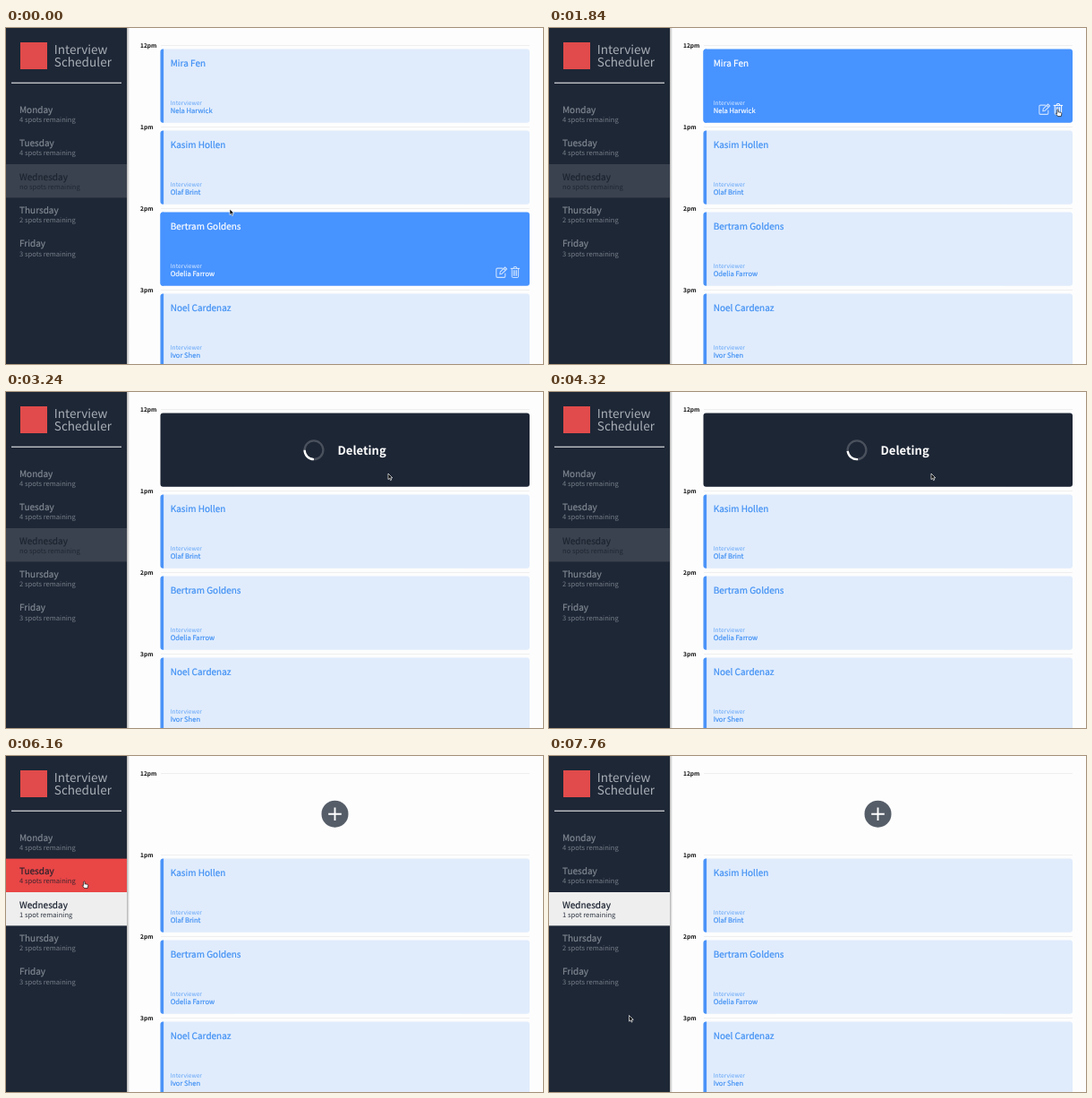
An HTML page that plays this animation: 600 px wide and 375 px high, repeating every 7.8 s.

```html
<!DOCTYPE html>
<html lang="en">
<head>
<meta charset="utf-8">
<title>Interview Scheduler</title>
<style>
  html, body { margin: 0; width: 100%; height: 100%; overflow: hidden; background: #fdfdfd; }
  svg { display: block; width: 600px; height: 375px; }
  text {
    font-family: "Noto Sans CJK JP", "Noto Sans CJK SC", "Noto Sans CJK", "Open Sans", sans-serif;
    font-size: 7.6px;
    text-rendering: geometricPrecision;
    white-space: pre;
    fill: currentColor;
  }
  .brand { font-size: 13.6px; font-weight: 300; color: #a8aeb6; }
  .title { font-size: 10px; }
  .title, .host { stroke: currentColor; stroke-width: .2px; }
  .light { font-weight: 300; }
  .small { font-size: 6.61px; font-weight: 300; }
  .hour { font-size: 6.61px; font-weight: 700; color: #111; }
  .status { font-size: 13.1px; font-weight: 700; color: #fff; }

  .day { color: #7f8791; }
  .day .back { fill: none; }
  .day .spots { fill-opacity: .9; }
  .day.full { color: #1c2430; }
  .day.full .back { fill: #3b424f; }
  .day.open { color: #1a2230; }
  .day.open .back { fill: #eeeeee; }
  .day.hover { color: #2c222c; }
  .day.hover .back { fill: #e94646; }

  .card { color: #4090f4; }
  .card .back { fill: #e0ecfc; }
  .card .edge { fill: #4a93f8; }
  .card .small { color: #62a4f7; }
  .card .icons { visibility: hidden; }
  .card.hover, .card.hover .small { color: #fff; }
  .card.hover .small { fill-opacity: .8; }
  .card.hover .back, .card.hover .edge { fill: #4793ff; }
  .card.hover .icons { visibility: inherit; }
  .icons path { fill: none; stroke: #fff; stroke-linecap: round; stroke-linejoin: round; opacity: .72; }
  .icons .bin.hover { opacity: 1; }
</style>
</head>
<body>
<svg id="stage" viewBox="0 0 600 375"></svg>
<script>
const LOOP = 7800;
const DELETE_START = 2150;
const DELETE_END = 4420;
const SLOT = 91;
const ROW = 37.4;
const ROW_TOP = 77.2;

const days = [
  ["Monday", "4 spots remaining"],
  ["Tuesday", "4 spots remaining"],
  ["Wednesday", "no spots remaining"],
  ["Thursday", "2 spots remaining"],
  ["Friday", "3 spots remaining"]
];
const bookings = [
  ["12pm", "Mira Fen", "Nela Harwick"],
  ["1pm", "Kasim Hollen", "Olaf Brint"],
  ["2pm", "Bertram Goldens", "Odelia Farrow"],
  ["3pm", "Noel Cardenaz", "Ivor Shen"]
];

// Pointer tip: time, x, y
const track = [
  [0, 250, 202], [160, 255, 199], [720, 420, 97], [920, 429, 93],
  [1150, 431, 93], [1650, 568, 91], [2050, 568, 91], [2650, 427, 91],
  [4380, 427, 91], [4840, 272, 97], [5200, 169.5, 101], [5750, 100, 126],
  [6160, 87, 140], [6500, 87, 140], [7150, 89.5, 268], [7400, 89.5, 289.5],
  [LOOP, 89.5, 289.5]
];

const label = (x, y, text, cls = "") => `<text x="${x}" y="${y}" class="${cls}">${text}</text>`;

const dayRow = ([name, spots], i) => `
  <g class="day" transform="translate(0 ${ROW_TOP + i * ROW})">
    <rect class="back" width="135" height="${ROW}"/>
    ${label(15, 17.5, name, "title")}
    ${label(15, 27.8, spots, "light spots")}
  </g>`;

const hourLine = ([hour], i) => `
  <g transform="translate(0 ${i * SLOT})">
    ${label(150, 22.2, hour, "hour")}
    <rect x="173" y="19" width="412" height="1" fill="#efefef"/>
  </g>`;

const card = ([, name, host], i) => `
  <g class="card" transform="translate(172.5 ${23.6 + i * SLOT})">
    <rect class="back" width="412.5" height="82.2" rx="3"/>
    <path class="edge" d="M3.6 0H3A3 3 0 0 0 0 3V79.2A3 3 0 0 0 3 82.2H3.6Z"/>
    ${label(11.2, 19.2, name, "title")}
    ${label(11.2, 62.3, "Interviewer", "small")}
    ${label(11.2, 71.6, host, "host")}
    <g class="icons">
      <path stroke-width="1.1" d="M382 62.5H376.6Q375.3 62.5 375.3 63.8V71.5Q375.3 72.8 376.6 72.8H384Q385.3 72.8 385.3 71.5V68.5
        M379.3 69.2 379.8 66.6 385 61.4 387 63.4 381.8 68.6Z M383.6 62.8 385.6 64.8"/>
      <path class="bin" stroke-width="1" d="M391.6 62.8H401.2 M394.5 62.6 395.1 61H397.7L398.3 62.6 M392.7 63V71.6Q392.7 72.9 394 72.9H398.8Q400.1 72.9 400.1 71.6V63
        M394.7 65V70.8 M396.4 65V70.8 M398.1 65V70.8"/>
    </g>
  </g>`;

const stage = document.getElementById("stage");
stage.innerHTML = `
  <defs>
    <linearGradient id="shade"><stop stop-color="#000" stop-opacity=".3"/><stop offset="1" stop-color="#000" stop-opacity="0"/></linearGradient>
  </defs>
  <rect width="600" height="375" fill="#fdfdfd"/>
  ${bookings.map(hourLine).join("")}
  ${bookings.map(card).join("")}
  <g id="busy">
    <rect x="172.5" y="23.6" width="412.5" height="82.2" rx="3" fill="#1d2635"/>
    <g fill="none" stroke="#fff" stroke-width="2.3">
      <circle cx="344" cy="64.8" r="10.4" stroke-opacity=".2"/>
      <path id="spin" d="M336.65 72.15A10.4 10.4 0 0 1 336.65 57.45"/>
    </g>
    ${label(370.5, 69.8, "Deleting", "status")}
  </g>
  <g id="add">
    <circle cx="367.5" cy="64.7" r="15" fill="#555d68"/>
    <path d="M360.2 64.7H374.8M367.5 57.4V72" stroke="#fff" stroke-width="1.9"/>
  </g>
  <rect x="135" width="3" height="375" fill="url(#shade)"/>
  <rect width="135" height="375" fill="#1e2736"/>
  <rect x="16" y="16" width="30" height="30" fill="#e14b4b"/>
  ${label(53.8, 29.4, "Interview", "brand")}
  ${label(53.8, 43.4, "Scheduler", "brand")}
  <rect x="6" y="60.7" width="123" height="1.1" fill="#e8e9eb"/>
  ${days.map(dayRow).join("")}
  <g id="pointer" stroke="#fff" stroke-width=".7" stroke-linejoin="round">
    <path id="arrow" fill="#000" d="M0 0V6.6L1.5 5.2 2.6 7.6 3.7 7.1 2.7 4.8H4.8Z"/>
    <path id="hand" fill="#fff" stroke="#111" d="M-.3 .4Q.4-.5 1.1 .4V2.8L4 3.3Q4.9 3.6 4.8 4.6L4.2 7.6H.6L-1.7 4.6Q-1.6 3.6-.3 4.5Z"/>
  </g>`;

const find = id => document.getElementById(id);
const [busy, spin, add, pointer, arrow, hand] = ["busy", "spin", "add", "pointer", "arrow", "hand"].map(find);
const rows = [...stage.querySelectorAll(".day")];
const cards = [...stage.querySelectorAll(".card")];
const bin = cards[0].querySelector(".bin");
const wednesday = rows[2].querySelector(".spots");

const show = (el, on) => el.setAttribute("visibility", on ? "visible" : "hidden");

function pointerAt(t) {
  const i = Math.max(1, track.findIndex(p => p[0] > t));
  const [t0, x0, y0] = track[i - 1];
  const [t1, x1, y1] = track[i];
  const u = (t - t0) / (t1 - t0);
  const k = u * u * (3 - 2 * u);
  return [x0 + (x1 - x0) * k, y0 + (y1 - y0) * k];
}

function draw(t) {
  const [x, y] = pointerAt(t);
  const deleted = t >= DELETE_END;
  const deleting = t >= DELETE_START && !deleted;
  const overRow = x < 135 ? Math.floor((y - ROW_TOP) / ROW) : -1;
  const overCard = x > 173 ? Math.floor((y - 19.5) / SLOT) : -1;
  const overBin = t < DELETE_START && x > 562 && overCard === 0;

  rows.forEach((row, i) => row.classList.toggle("hover", i === overRow && i !== 2));
  rows[2].classList.toggle("full", !deleted);
  rows[2].classList.toggle("open", deleted);
  wednesday.textContent = deleted ? "1 spot remaining" : days[2][1];

  cards.forEach((el, i) => el.classList.toggle("hover", i === overCard));
  bin.classList.toggle("hover", overBin);
  show(cards[0], t < DELETE_START);
  show(busy, deleting);
  show(add, deleted);
  spin.setAttribute("transform", `rotate(${315 + (t - 3240) / 1100 * 360} 344 64.8)`);

  const link = overBin || (overRow >= 0 && overRow < rows.length);
  show(arrow, !link);
  show(hand, link);
  pointer.setAttribute("transform", `translate(${x} ${y})`);
}

const start = performance.now();
function tick() {
  draw((performance.now() - start) % LOOP);
  requestAnimationFrame(tick);
}
tick();
</script>
</body>
</html>
```
